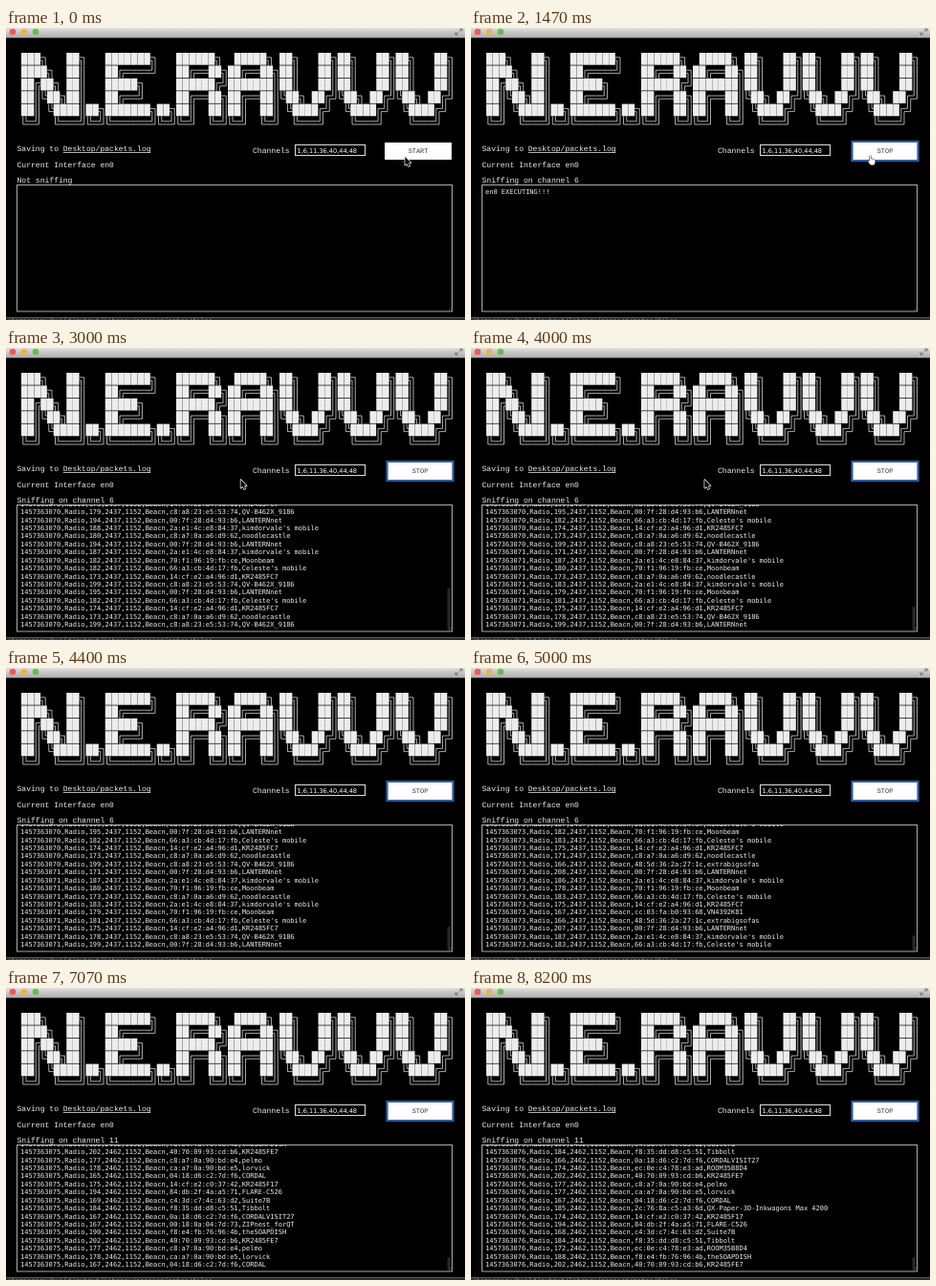
Recreate the animation shown at these times as an HTML page with a canvas. Size 480 by 306 pixels, loop 8.27 s.

```html
<!DOCTYPE html>
<html lang="en">
<head>
<meta charset="utf-8">
<title>Packet sniffer</title>
<style>
  html, body { margin: 0; width: 100%; height: 100%; overflow: hidden; background: #000; }
  canvas { display: block; width: 480px; height: 306px; }
</style>
</head>
<body>
<canvas id="stage"></canvas>
<script>
const LOOP = 8270;
const MONO = '"Liberation Mono", monospace';
const LOG_FONT = '"DejaVu Sans Mono", monospace';
const canvas = document.getElementById('stage');
const ctx = canvas.getContext('2d');
const dpr = window.devicePixelRatio || 1;
canvas.width = 480 * dpr;
canvas.height = 306 * dpr;
ctx.scale(dpr, dpr);
ctx.textRendering = 'geometricPrecision';

const glyphs = {
  N: ['███╗   ██╗', '████╗  ██║', '██╔██╗ ██║', '██║╚██╗██║', '██║ ╚████║', '╚═╝  ╚═══╝'],
  E: ['███████╗', '██╔════╝', '█████╗  ', '██╔══╝  ', '███████╗', '╚══════╝'],
  R: ['██████╗ ', '██╔══██╗', '██████╔╝', '██╔══██╗', '██║  ██║', '╚═╝  ╚═╝'],
  A: [' █████╗ ', '██╔══██╗', '███████║', '██╔══██║', '██║  ██║', '╚═╝  ╚═╝'],
  V: ['██╗   ██╗', '██║   ██║', '██║   ██║', '╚██╗ ██╔╝', ' ╚████╔╝ ', '  ╚═══╝  '],
  '.': ['   ', '   ', '   ', '   ', '██╗', '╚═╝']
};
// Directions of the horizontal and vertical arm of each corner
const corners = { '╗': [-1, 1], '╔': [1, 1], '╝': [-1, -1], '╚': [1, -1] };

// key, hardware address, network name
const devices = {};
`O 00:7f:28:d4:93:b6 LANTERNnet
A 66:a3:cb:4d:17:fb Celeste's mobile
K 2a:e1:4c:e8:84:37 kimdorvale's mobile
N c8:a7:0a:a6:d9:62 noodlecastle
V 70:f1:96:19:fb:ce Moonbeam
D 14:cf:e2:a4:96:d1 KR2485FC7
S c8:a8:23:e5:53:74 QV-B462X_9186
P 00:26:08:e2:5b:97 tulip-wifi
Q 00:26:08:e2:5b:97 BROADCAST
G 40:70:09:93:cd:b1 KR2485FE7-5G
W 48:5d:36:2a:27:1c extrabigsofas
T cc:03:fa:b0:93:68 VN4392K81
E 40:70:09:93:cd:b6 KR2485FE7
F c8:a7:0a:90:bd:e4 pelmo
J ca:a7:0a:90:bd:e5 lorvick
C 04:18:d6:c2:7d:f6 CORDAL
X 0a:18:d6:c2:7d:f6 CORDALVISIT27
M 14:cf:e2:c0:37:42 KR2485F17
U 84:db:2f:4a:a5:71 FLARE-C526
H c4:3d:c7:4c:63:d2 Suite7B
I f8:35:dd:d8:c5:51 Tibbolt
Z 00:18:0a:04:7d:73 ZIPnest_forQT
R f8:e4:fb:76:96:4b theSOAPDISH
L 2c:76:8a:c5:a3:6d QX-Paper-3D-Inkwagons Max 4200
Y ec:0e:c4:78:e3:ad ROOM35B8D4`.split('\n').forEach(row => {
  devices[row[0]] = row.slice(2);
});
const modes = { P: '5180,320,Probe', Q: '5180,320,Probe', G: '5200,1152,Beacn' };

// Time of arrival, clock second, frequency, then device and signal per packet
const log = [];
const batches = [
  [1995, 69, 2437, 'P182 Q177 P182 P188 G189'],
  [1995, 70, 2437, 'A183 D175 S179 O194 K188 N180 O194 K187 V182 A182 D173'],
  [2995, 70, 2437, 'S199 O195 A182 D174 N173 S199'],
  [3995, 71, 2437, 'O171 K187 V180 N173 K183 V179 A181 D175 S178 O199'],
  [4995, 73, 2437, 'K187 V182 A183 D175 N171 W166 O208 K186 V178 A183 D175 T167 W166 O207 K187 A183'],
  [5995, 74, 2437, 'V180 D174 O207 W166 A182 K187 N172 T167 V181 D175 O206 W165 K186 A183 V179 N171'],
  [7065, 75, 2462, 'R188 E202 F177 J178 C165 M175 U194 H169 I184 X167 Z167 R190 E202 F177 J178 C167'],
  [7995, 76, 2462, 'H169 I184 X166 Y174 E202 F177 J177 C167 L185 M174 U194 H168 I184 Y172 R188 E202']
].map(([time, second, freq, packets]) => {
  for (const p of packets.split(' ')) {
    const mode = modes[p[0]] || freq + ',1152,Beacn';
    log.push('14573630' + second + ',Radio,' + p.slice(1) + ',' + mode + ',' + devices[p[0]].replace(' ', ','));
  }
  return { time, count: log.length };
});

function text(str, x, y, size, family = MONO, color = '#eee', align = 'left') {
  ctx.font = size + 'px ' + family;
  ctx.fillStyle = color;
  ctx.textAlign = align;
  ctx.fillText(str, x, y);
}

function rect(x, y, w, h, color) {
  ctx.fillStyle = color;
  ctx.fillRect(x, y, w, h);
}

function frame(x, y, w, h, color, width = 1) {
  ctx.strokeStyle = color;
  ctx.lineWidth = width;
  ctx.strokeRect(x, y, w, h);
}

function line(...points) {
  ctx.beginPath();
  points.forEach(p => ctx.lineTo(...p));
  ctx.stroke();
}

function drawCell(ch, x, y) {
  const w = 6.75, h = 13.4, gap = 1.6;
  const cx = x + w / 2, cy = y + h / 2 - 0.3;
  if (ch === '█') return rect(x, y, 6.6, 12.7, '#ededed');
  for (const s of [-gap, gap]) {
    if (ch === '═') line([x, cy + s], [x + w, cy + s]);
    if (ch === '║') line([cx + s, y], [cx + s, y + h]);
    if (corners[ch]) {
      const [dx, dy] = corners[ch];
      line([cx + dx * w / 2, cy + s * dy], [cx + s * dx, cy + s * dy], [cx + s * dx, cy + dy * h / 2]);
    }
  }
}

function drawBanner() {
  ctx.strokeStyle = '#bbb';
  ctx.lineWidth = 0.9;
  for (let row = 0; row < 6; row++) {
    const cells = [...'N.E.RAVVV'].map(c => glyphs[c][row]).join('');
    [...cells].forEach((ch, i) => drawCell(ch, 16 + i * 6.75, 26 + row * 13.4));
  }
}

function drawWindow() {
  rect(0, 0, 480, 306, '#000');
  const bar = ctx.createLinearGradient(0, 0, 0, 10);
  bar.addColorStop(0, '#dedede');
  bar.addColorStop(1, '#adadad');
  rect(0, 0, 480, 10, bar);
  rect(0, 10, 480, 0.7, '#555');
  ['#ee5a50', '#f0b43c', '#62bd4a'].forEach((color, i) => {
    ctx.beginPath();
    ctx.arc(7 + i * 12, 4, 3.3, 0, 7);
    ctx.fillStyle = color;
    ctx.fill();
  });
  ctx.strokeStyle = '#666';
  ctx.lineWidth = 0.9;
  line([470, 7], [473, 4.4]);
  line([470, 4.5], [470, 7], [472.5, 7]);
  line([474, 3.6], [477, 1]);
  line([474.5, 1], [477, 1], [477, 3.5]);
  rect(0, 303, 480, 3, '#2a2a2a');
  rect(0, 303, 480, 0.8, '#666');
  text('/temporary/build/output/library/session/notes/files', 1, 309, 7, LOG_FONT, '#888');
}

function drawControls(t) {
  text('Saving to Desktop/packets.log', 11.5, 129, 8.05);
  rect(59.8, 130.2, 91.5, 0.8, '#ddd');
  text('Current Interface en0', 11.5, 145.5, 8.05);
  const status = t < 1470 ? 'Not sniffing' : 'Sniffing on channel ' + (t < 6470 ? 6 : 11);
  text(status, 11.5, 162.3, 8.05);
  text('Channels', 258, 131, 8.05);
  frame(302.5, 122.5, 73, 11, '#ddd');
  text('1,6,11,36,40,44,48', 304.5, 130.7, 6.55, '"DejaVu Sans", sans-serif', '#fff');
  if (t < 1000) {
    rect(396, 120, 70, 18, '#fff');
    text('START', 431, 131, 6.9, MONO, '#333', 'center');
  } else {
    frame(398.5, 119, 69, 20, '#2f5f9f', 2.2);
    rect(399.5, 120, 67, 18, '#fff');
    text('STOP', 433, 131, 6.9, MONO, '#333', 'center');
  }
}

function drawLog(t) {
  frame(11.5, 164.5, 455, 132.5, '#aaa');
  const arrived = batches.filter(b => b.time <= t);
  ctx.save();
  ctx.beginPath();
  ctx.rect(12, 164, 454, 132.5);
  ctx.clip();
  const last = arrived[arrived.length - 1];
  if (last) {
    for (let k = 0; k < 16; k++) {
      text(log[last.count - 1 - k], 15, 292.2 - k * 8.43, 7, LOG_FONT);
    }
    if (t - last.time < 730) {
      const height = Math.max(14, 400 / arrived.length ** 2);
      ctx.beginPath();
      ctx.roundRect(461.5, 296 - height, 3.5, height, 1.7);
      ctx.fillStyle = '#262626';
      ctx.fill();
    }
  } else if (t >= 1000) {
    text('en0 EXECUTING!!!', 15, 174.2, 7, LOG_FONT);
  }
  ctx.strokeStyle = '#777';
  ctx.lineWidth = 0.5;
  line([463, 296], [466, 293]);
  ctx.restore();
}

const arrow = new Path2D('M0 0V8.7L2 6.9 3.4 10 4.9 9.4 3.5 6.4H6.2Z');
const hand = new Path2D('M1.8 1Q2.6-.3 3.4 1V4Q4.2 3.2 5 4.2 5.8 3.6 6.4 4.6 7.4 4.2 7.6 5.4V7.4L6.6 10H2.8L.2 6.6Q-.3 5.3 1.8 6Z');

function drawCursor(t) {
  if (t > 4130) return;
  const u = Math.min(1, Math.max(0, (t - 2070) / 1000));
  const e = 1 - (1 - u) ** 1.86;
  const drop = Math.max(0, (t - 4005) / 125);
  const x = 417.3 - 173 * e + 2 * drop;
  const y = 135 + 3 * e + 3.5 * Math.sin(Math.PI * e) + 26 * drop;
  const pointing = t >= 70 && x > 400;
  ctx.save();
  ctx.translate(pointing ? x - 2.3 : x, pointing ? y - 1.5 : y);
  ctx.lineJoin = 'round';
  ctx.lineWidth = pointing ? 0.9 : 1.4;
  ctx.strokeStyle = pointing ? '#000' : '#fff';
  ctx.fillStyle = pointing ? '#fff' : '#000';
  const shape = pointing ? hand : arrow;
  ctx.stroke(shape);
  ctx.fill(shape);
  ctx.restore();
}

const start = performance.now();
function draw(now) {
  const t = Math.max(0, now - start) % LOOP;
  drawWindow();
  drawBanner();
  drawControls(t);
  drawLog(t);
  drawCursor(t);
  requestAnimationFrame(draw);
}
draw(start);
</script>
</body>
</html>
```
